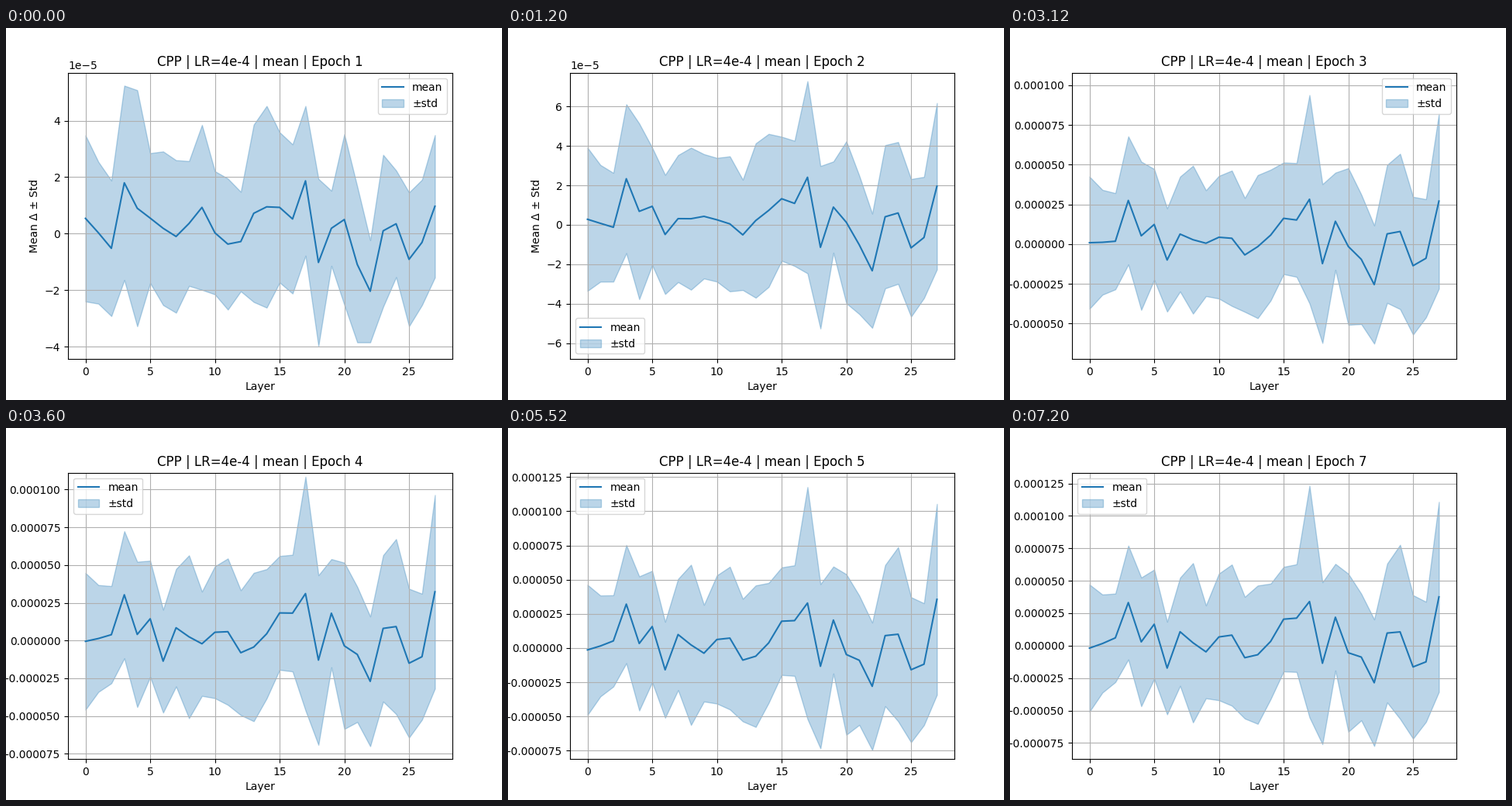
A matplotlib script for the animation above (8000 ms loop, 640x480 px).

```python
import numpy as np
import matplotlib.pyplot as plt
from matplotlib.animation import FuncAnimation

INTERVAL = 400        # ms
TICKS_PER_EPOCH = 3   # each epoch stays for 1200 ms
N_FRAMES = 20
UNIT = 1e-6
MARGIN = 0.05

# Per-layer curves at the start and end of training, in UNIT
MEAN_START = [5.4, 0.3, -5.2, 18.0, 9.0, 5.5, 1.9, -1.0, 3.6, 9.3,
              0.3, -3.7, -2.8, 7.2, 9.5, 9.3, 5.2, 18.7, -10.2, 1.9,
              5.0, -10.9, -20.4, 1.0, 3.5, -9.1, -3.1, 9.7]
MEAN_END = [-1.9, 1.6, 6.0, 33.2, 2.9, 16.5, -17.3, 10.7, 2.2, -4.8,
            6.7, 8.1, -9.3, -7.0, 3.3, 20.4, 21.2, 34.0, -13.6, 21.9,
            -5.5, -8.8, -28.6, 9.7, 10.6, -16.4, -12.5, 37.6]
STD_START = [29.4, 25.1, 24.0, 34.4, 41.8, 23.0, 27.2, 27.0, 22.1, 29.2,
             21.8, 23.2, 17.6, 31.4, 35.7, 26.6, 26.4, 26.5, 29.6, 13.3,
             30.2, 27.6, 18.1, 26.9, 18.9, 23.7, 22.2, 25.2]
STD_END = [49.0, 37.8, 34.1, 43.9, 49.6, 42.1, 35.7, 41.7, 61.4, 35.8,
           48.8, 54.4, 46.9, 53.3, 44.5, 40.3, 41.5, 89.3, 62.4, 41.1,
           60.9, 48.8, 48.8, 53.5, 67.1, 55.3, 46.3, 73.2]

# Value range and legend corner of each epoch's view
VIEWS = [(-39.8, 52.4, "upper right"),
         (-61.5, 70.6, "lower left"),
         (-64.2, 99.7, "upper right"),
         (-69.9, 102.6, "upper left"),
         (-71.68, 118.72, "upper left"),
         (-75.57, 122.43, "upper left"),
         (-77.4, 123.3, "upper left")]

layers = np.arange(len(MEAN_START))
fig, ax = plt.subplots(figsize=(6.4, 4.8), dpi=100)


def ease_out(t, power=2.4):
    return 1 - (1 - t) ** power


def blend(start, end, amount):
    start, end = np.array(start), np.array(end)
    return (start + (end - start) * amount) * UNIT


def draw(frame):
    index = frame // TICKS_PER_EPOCH
    low, high, corner = VIEWS[index]
    pad = (high - low) * MARGIN
    progress = ease_out(index / (len(VIEWS) - 1))
    mean = blend(MEAN_START, MEAN_END, progress)
    std = blend(STD_START, STD_END, progress)

    ax.clear()
    ax.plot(layers, mean, color="C0", label="mean")
    ax.fill_between(layers, mean - std, mean + std, color="C0", alpha=0.3,
                    label="±std")
    ax.set_ylim((low - pad) * UNIT, (high + pad) * UNIT)
    ax.set_title(f"CPP | LR=4e-4 | mean | Epoch {index + 1}")
    ax.set_xlabel("Layer")
    ax.set_ylabel("Mean Δ ± Std")
    ax.grid(True)
    ax.legend(loc=corner)
    return []


anim = FuncAnimation(fig, draw, frames=N_FRAMES, interval=INTERVAL,
                     repeat=True, repeat_delay=0)
plt.show()
```
